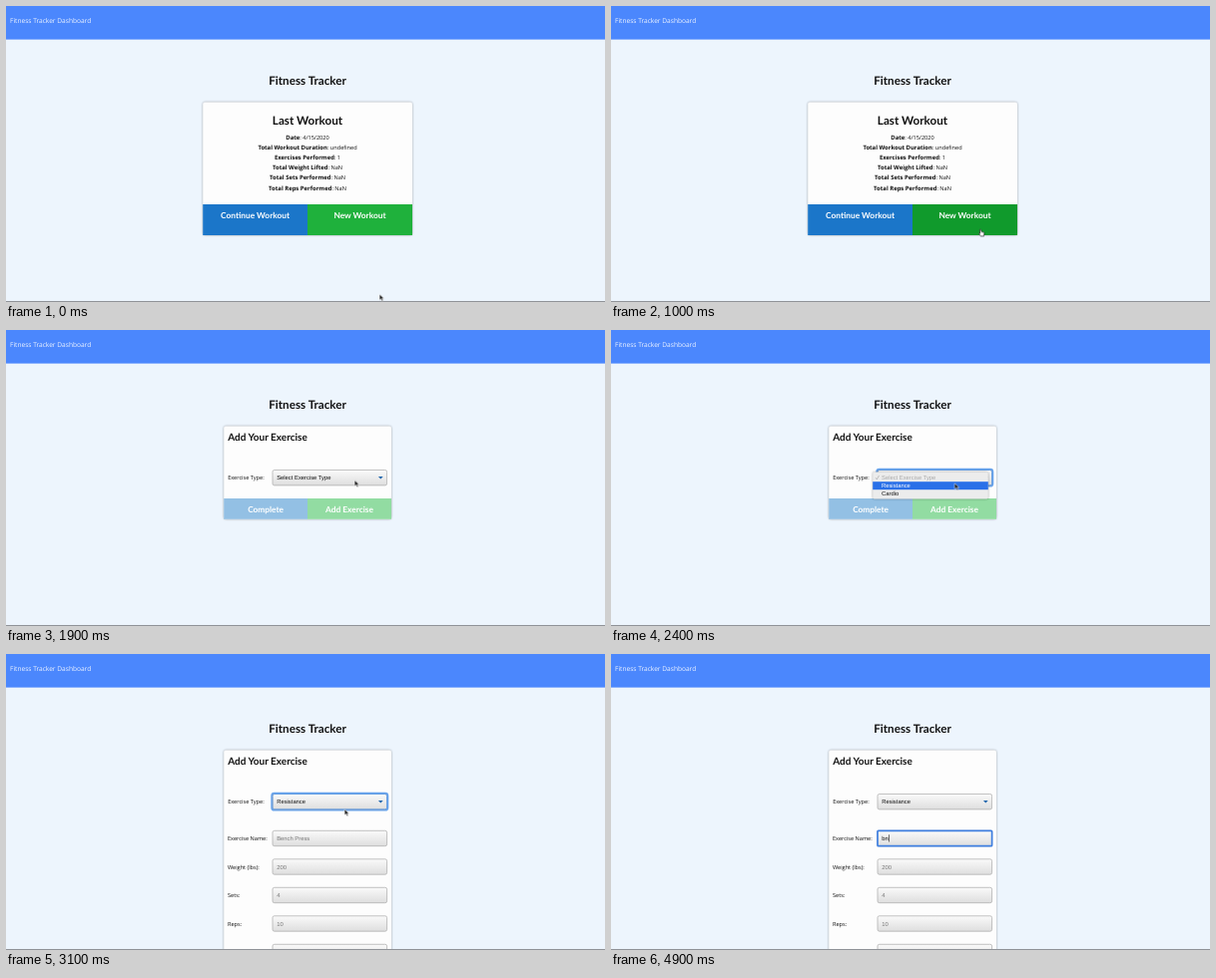
Write an HTML page that moves like this. It is 600 px wide and 297 px high and loops after 5000 ms.

```html
<!DOCTYPE html>
<html lang="en">
<head>
<meta charset="utf-8">
<title>Fitness Tracker</title>
<style>
  html, body { margin: 0; width: 100%; height: 100%; overflow: hidden; background: #edf5fd; }
  svg { display: block; width: 100%; height: 100%; }
  text { font: 5.6px "Open Sans", "Noto Sans", sans-serif; fill: #111; text-rendering: geometricPrecision; white-space: pre; }
  .bold { font-weight: 700; font-size: 5.92px; }
  .nav { font-size: 6.6px; fill: #f0f5ff; }
  .h1, .h2, .h3 { font: 700 11.67px Lato, sans-serif; }
  .h2 { font-size: 10px; }
  .h3 { font-size: 8.33px; fill: #fff; }
  .field { font: 5.83px "Liberation Sans", Arial, sans-serif; }
  .hint { fill: #777; }
  .muted { fill: #aaa; }
  .light { fill: #fff; }
  .saved { font: 500 5.5px Inter, sans-serif; }
  .mid { text-anchor: middle; }
  .shadow { filter: drop-shadow(0 .6px 1.3px rgba(0, 0, 0, .36)); }
</style>
</head>
<body>
<svg id="stage" viewBox="0 0 600 297" preserveAspectRatio="none">
  <defs>
    <linearGradient id="face" x1="0" y1="0" x2="0" y2="1">
      <stop offset="0" stop-color="#fafafa"/>
      <stop offset="1" stop-color="#dedede"/>
    </linearGradient>
  </defs>
</svg>
<script>
const LOOP = 5000;
const stage = document.getElementById('stage');

const text = (x, y, cls, content) => `<text x="${x}" y="${y}" class="${cls}">${content}</text>`;
const rect = (x, y, w, h, fill, extra = '') =>
  `<rect x="${x}" y="${y}" width="${w}" height="${h}" fill="${fill}" ${extra}/>`;
const group = (id, ...parts) => `<g id="${id}">${parts.join('')}</g>`;
const card = (x, w, h) => rect(x, 96.6, w, h, '#fdfdfd', 'rx="2" class="shadow"');
const button = (x, y, w, h, fill, label, baseline) =>
  rect(x, y, w, h, fill) + text(x + w / 2, baseline, 'h3 mid', label);
const box = y => rect(267, y, 114.6, 15.4, 'url(#face)', 'rx="1.8" stroke="#a9a9a9" stroke-width=".7"');
const caret = (id, x) => group(id, rect(x, 181.3, .6, 7.2, '#111'));

const summary = [
  ['Date', '4/15/2020'],
  ['Total Workout Duration', 'undefined'],
  ['Exercises Performed', '1'],
  ['Total Weight Lifted', 'NaN'],
  ['Total Sets Performed', 'NaN'],
  ['Total Reps Performed', 'NaN']
].map(([key, value], i) =>
  text(302, 134.2 + i * 10.06, 'mid', `<tspan class="bold">${key}</tspan>: ${value}`));

const inputs = [
  ['Exercise Name:', ''], ['Weight (lbs):', '200'], ['Sets:', '4'], ['Reps:', '10'], ['', '']
].map(([label, hint], i) => {
  const y = 177.3 + i * 28.5;
  return text(222, y + 9.9, '', label) + box(y) + text(271.2, y + 9.8, 'field hint', hint);
});

const dashboard = group('dashboard',
  card(197.2, 209.8, 133.4),
  text(302, 119, 'h1 mid', 'Last Workout'),
  ...summary,
  button(197.2, 199, 104.8, 31, '#1b76c9', 'Continue Workout', 213.1),
  button(302, 199, 105, 31, '#1fb13c', 'New Workout', 213.1),
  group('hover', button(302, 199, 105, 31, '#109a2c', 'New Workout', 213.1)));

const shortForm = group('shortForm',
  card(218.2, 167.8, 93.2),
  button(218.2, 169, 83.8, 20.8, '#93c0e4', 'Complete', 183),
  button(302, 169, 84, 20.8, '#92dca2', 'Add Exercise', 183));

const longForm = group('longForm', card(218.2, 167.8, 220), ...inputs);

const typeRow = group('typeRow',
  text(222.2, 110.7, 'h2', 'Add Your Exercise'),
  text(222.2, 150.4, '', 'Exercise Type:'),
  group('typeFocus', rect(266.3, 139.8, 116, 16.8, 'none', 'rx="2.4" stroke="#69a5ee" stroke-width="2"')),
  box(140.5),
  group('typeRing', rect(267, 140.5, 114.6, 15.4, 'none', 'rx="1.8" stroke="#5c9ae6" stroke-width=".9"')),
  '<path d="M372.9 147h4.8l-2.4 2.6z" fill="#1f66ad"/>',
  group('typeEmpty', text(271.2, 150.3, 'field', 'Select Exercise Type')),
  group('typeChosen', text(271.2, 150.3, 'field', 'Resistance')));

const menu = group('menu',
  rect(262.2, 142.4, 115.6, 27, '#ececec', 'rx="1.6" class="shadow"'),
  '<path d="M265 148.2l1.3 1.7 2.2-3.9" fill="none" stroke="#aaa" stroke-width=".7"/>',
  text(271, 150.3, 'field muted', 'Select Exercise Type'),
  group('menuPick', rect(262.2, 152.2, 115.6, 8, '#2a70e8')),
  group('pickDark', text(271, 158.2, 'field', 'Resistance')),
  group('pickLight', text(271, 158.2, 'field light', 'Resistance')),
  text(271, 166.2, 'field', 'Cardio'));

const nameField = group('nameField',
  group('nameFocus', rect(267, 177.3, 114.6, 15.4, 'url(#face)', 'rx=".8" stroke="#3f7fe0" stroke-width="1.7"')),
  group('nameHint', text(271.2, 187.1, 'field hint', 'Bench Press')),
  group('typedB', text(271.2, 187.1, 'field', 'b')),
  group('typedBn', text(271.2, 187.1, 'field', 'bn')),
  caret('caretStart', 271), caret('caretB', 274.7), caret('caretBn', 278));

const suggestions = group('suggestions',
  rect(266.4, 194, 115.6, 51.8, '#fdfdfd', 'class="shadow"'),
  ...['dorvin', 'fadsf', 'Dorvin Pel'].map((word, i) => text(271.5, 206.4 + i * 15.1, 'saved', word)));

const pointer = group('pointer',
  group('arrow', '<path d="M0 0v5.8l1.4-1.2 1 2.2 1.1-.5-1-2.1h1.8z" fill="#111" stroke="#fff" stroke-width=".5"/>'),
  group('hand', '<path d="M-.6 0q.7-.7 1.2.1l.5 2 2.2.5q.8.3.6 1.4l-.5 2.5H.5L-1.5 4l.5-.8.9.5z" fill="#fff" stroke="#111" stroke-width=".6"/>'),
  group('beam', '<path d="M-1.3-3Q0-3 0-2.3Q0-3 1.3-3M0-2.3v4.8M-1.3 3.2Q0 3.2 0 2.5Q0 3.2 1.3 3.2" fill="none" stroke="#222" stroke-width=".7"/>'));

stage.innerHTML += [
  rect(0, 0, 600, 297, '#edf5fd'),
  rect(0, 0, 600, 33.6, '#4b87fd'),
  text(4, 17.4, 'nav', 'Fitness Tracker Dashboard'),
  text(302, 79, 'h1 mid', 'Fitness Tracker'),
  dashboard, shortForm, longForm, typeRow, nameField, menu, suggestions,
  rect(0, 296, 600, 1, '#909398'),
  pointer
].join('');

// Hard steps: rows are [ms, style], the first one at 0.
function play(id, rows) {
  const frames = rows.map(([ms, style]) => ({ ...style, offset: ms / LOOP, easing: 'step-end' }));
  frames.push({ ...rows[rows.length - 1][1], offset: 1 });
  document.getElementById(id).animate(frames, { duration: LOOP, iterations: Infinity });
}

function show(id, from, to = LOOP) {
  const rows = [[from, { opacity: 1 }]];
  if (from > 0) rows.unshift([0, { opacity: 0 }]);
  if (to < LOOP) rows.push([to, { opacity: 0 }]);
  play(id, rows);
}

const spans = {
  dashboard: [0, 1100], hover: [600, 1100],
  shortForm: [1100, 2700], longForm: [2700], typeRow: [1100],
  typeEmpty: [1100, 2600], typeChosen: [2600],
  typeFocus: [2100, 3600], typeRing: [2100, 3600],
  menu: [2100, 2600], menuPick: [2300, 2600], pickDark: [2100, 2300], pickLight: [2300, 2600],
  nameField: [2700], nameFocus: [3600], nameHint: [2700, 4600],
  caretStart: [3600, 4200], suggestions: [3700, 4700],
  typedB: [4600, 4900], caretB: [4600, 4900], typedBn: [4900], caretBn: [4900],
  hand: [600, 1100], beam: [3500, 4600]
};
for (const id in spans) show(id, ...spans[id]);

play('arrow', [[0, 1], [600, 0], [1100, 1], [3500, 0]].map(([ms, opacity]) => [ms, { opacity }]));

const path = [
  [0, 374.2, 289.3], [100, 373, 270], [300, 372, 262], [400, 372, 250], [500, 371, 238],
  [600, 371, 229], [700, 370.5, 226], [800, 370, 224.4],
  [1500, 366, 212], [1600, 360, 190], [1700, 354, 168], [1800, 351, 155], [1900, 349.3, 150.7],
  [2200, 348, 151], [2300, 346, 152.5], [2400, 344.3, 153.7],
  [2700, 343.5, 154], [2900, 341, 155], [3000, 339.2, 155.8],
  [3300, 335, 161], [3400, 326, 172], [3500, 319, 181], [3600, 316, 183.5]
];
play('pointer', path.map(([ms, x, y]) => [ms, { transform: `translate(${x}px, ${y}px)` }]));
</script>
</body>
</html>
```
